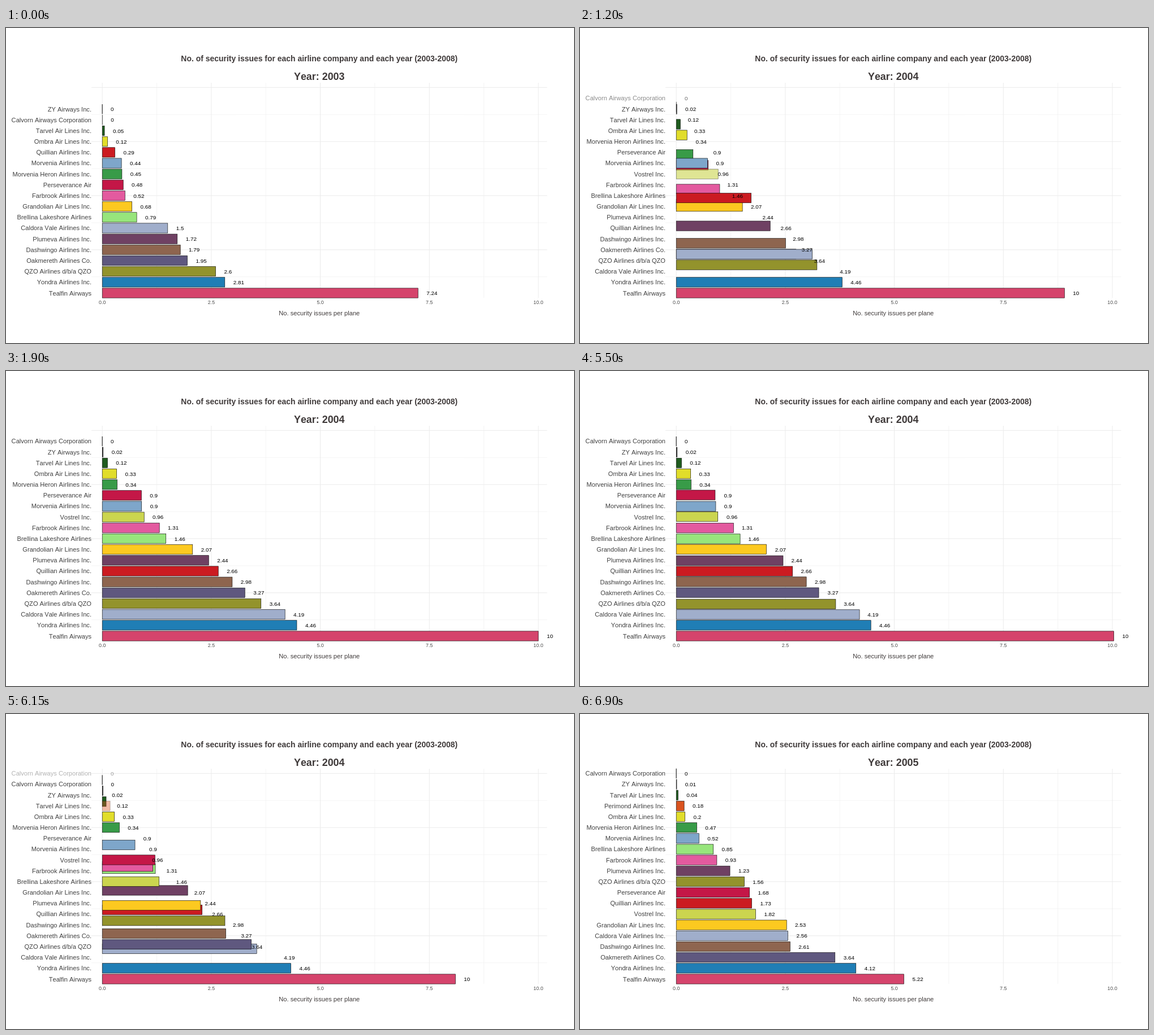
Animation, 1004 px wide and 558 px high, one loop 8000 ms. Source, as an HTML page with a canvas:

```html
<!DOCTYPE html>
<html lang="en">
<head>
<meta charset="utf-8">
<title>Security issues per airline</title>
<style>
html, body { margin: 0; width: 100%; height: 100%; overflow: hidden; background: #fff; }
canvas { display: block; }
</style>
</head>
<body>
<canvas id="stage" width="1004" height="558"></canvas>
<script>
const ctx = document.getElementById('stage').getContext('2d');
ctx.fontKerning = 'none';

// name, colour, issues per plane in 2003, 2004, 2005 (null: not yet listed)
const airlines = [
  ['ZY Airways Inc.', '#333333', 0, 0.02, 0.01],
  ['Calvorn Airways Corporation', '#777777', 0.001, 0, 0],
  ['Tarvel Air Lines Inc.', '#1f5c1f', 0.05, 0.12, 0.04],
  ['Ombra Air Lines Inc.', '#e1dd2b', 0.12, 0.33, 0.2],
  ['Quillian Airlines Inc.', '#cb1b21', 0.29, 2.66, 1.73],
  ['Morvenia Airlines Inc.', '#7ea6ca', 0.44, 0.902, 0.52],
  ['Morvenia Heron Airlines Inc.', '#389b48', 0.45, 0.34, 0.47],
  ['Perseverance Air', '#c41747', 0.48, 0.897, 1.68],
  ['Farbrook Airlines Inc.', '#e35a9f', 0.52, 1.31, 0.93],
  ['Grandolian Air Lines Inc.', '#fcc920', 0.68, 2.07, 2.53],
  ['Brellina Lakeshore Airlines', '#97e57c', 0.79, 1.46, 0.85],
  ['Caldora Vale Airlines Inc.', '#a0aecb', 1.5, 4.19, 2.56],
  ['Plumeva Airlines Inc.', '#6f4163', 1.72, 2.44, 1.23],
  ['Dashwingo Airlines Inc.', '#8e654f', 1.79, 2.98, 2.61],
  ['Oakmereth Airlines Co.', '#5f587f', 1.95, 3.27, 3.64],
  ['QZO Airlines d/b/a QZO', '#93932c', 2.6, 3.64, 1.56],
  ['Yondra Airlines Inc.', '#207eb5', 2.81, 4.46, 4.12],
  ['Tealfin Airways', '#d5446c', 7.24, 10, 5.22],
  ['Vostrel Inc.', '#cbd54f', null, 0.96, 1.82],
  ['Perimond Airlines Inc.', '#da531f', null, null, 0.18]
].map(([name, color, ...values]) => ({ name, color, values }));

// One ranking per year, largest value first
const rankings = [0, 1, 2].map(y => airlines
  .filter(a => a.values[y] !== null)
  .sort((a, b) => b.values[y] - a.values[y]));

const LOOP = 8000, STEP = 50, STEPS = 29, STARTS = [450, 5450];
const ROW = 19.167, BAR = ROW * 0.9;
const LEFT = 151, RIGHT = 956.5, TOP = 97, BOTTOM = 478.2;
const xAt = v => 170.2 + 77.08 * v;
const yAt = rank => 469.5 - ROW * rank;
const mix = (a, b, p) => a + (b - a) * p;
const clamp = (v, lo, hi) => Math.min(hi, Math.max(lo, v));

function backInOut(p) {
  const back = f => (f ** 3 - f * Math.sin(f * Math.PI)) / 2;
  return p < 0.5 ? back(2 * p) : 1 - back(2 - 2 * p);
}

function text(str, x, y, size, color, align = 'center', weight = '') {
  ctx.font = `${weight} ${size}px "Liberation Sans", Arial, sans-serif`;
  ctx.fillStyle = color;
  ctx.textAlign = align;
  ctx.fillText(str, x, y);
}

function line(x1, y1, x2, y2, width) {
  ctx.lineWidth = width;
  ctx.beginPath();
  ctx.moveTo(x1, y1);
  ctx.lineTo(x2, y2);
  ctx.stroke();
}

function drawGrid() {
  ctx.strokeStyle = '#ebebeb';
  for (let i = 0; i < 9; i++) {
    const x = xAt(i * 1.25);
    line(x, TOP, x, BOTTOM, i % 2 ? 0.5 : 1);
    if (i % 2 === 0) text((i * 1.25).toFixed(1), x, 488.7, 8.92, '#4d4d4d');
  }
  for (let i = 0; i < 8; i++) {
    const y = yAt(19 - 2.5 * i);
    line(LEFT, y, RIGHT, y, i % 2 ? 0.5 : 1);
  }
}

function drawBar(airline, year, p, fade) {
  const ends = [year, year + 1].map(y => ({
    value: airline.values[y],
    rank: rankings[y].indexOf(airline)
  }));
  const [from, to] = fade ? [ends[1], ends[1]] : ends;
  const x = xAt(0);
  const w = xAt(mix(from.value, to.value, p)) - x;
  const y = yAt(mix(from.rank, to.rank, p)) - BAR / 2;
  ctx.globalAlpha = fade ? clamp(p, 0, 1) : 1;
  ctx.fillStyle = airline.color;
  ctx.strokeStyle = '#000';
  ctx.lineWidth = 0.6;
  ctx.fillRect(x, y, w, BAR);
  ctx.strokeRect(x, y, w, BAR);
}

// Texts belong to a rank: they only slide sideways and swap halfway
function drawRow(rank, year, p, shownYear) {
  const next = rankings[year + 1][rank], prev = rankings[year][rank];
  const end = next.values[year + 1];
  const start = prev ? prev.values[year] : end;
  const shown = prev && shownYear === year ? prev : next;
  const value = prev ? shown.values[shownYear] : end;
  const y = yAt(rank);
  ctx.globalAlpha = prev ? 1 : clamp(p, 0, 1);
  text(shown.name, LEFT, y + 4, 11.11, '#404040', 'right');
  text(String(+value.toFixed(2)), xAt(mix(start, end, p)) + 14.9, y + 3.6, 9.9, '#000', 'left');
}

function draw(time) {
  const year = time < STARTS[1] ? 0 : 1;
  const step = clamp(Math.floor((time - STARTS[year]) / STEP), 0, STEPS);
  const p = backInOut(step / STEPS);
  const shownYear = step / STEPS < 0.5 ? year : year + 1;
  const old = rankings[year];
  const entering = rankings[year + 1].filter(a => !old.includes(a));

  ctx.globalAlpha = 1;
  ctx.fillStyle = '#fff';
  ctx.fillRect(0, 0, 1004, 558);
  drawGrid();
  old.forEach(a => drawBar(a, year, p, false));
  entering.forEach(a => drawBar(a, year, p, true));
  rankings[year + 1].forEach((_, rank) => drawRow(rank, year, p, shownYear));

  ctx.globalAlpha = 1;
  const ink = '#3f3a3a', mid = (LEFT + RIGHT) / 2;
  text('No. of security issues for each airline company and each year (2003-2008)', mid, 59.4, 13.94, ink, 'center', 'bold');
  text('Year: ' + (2003 + shownYear), mid, 92.4, 17.9, ink, 'center', 'bold');
  text('No. security issues per plane', mid, 508.6, 11.15, ink);
}

const begin = performance.now();
function tick() {
  draw((performance.now() - begin) % LOOP);
  requestAnimationFrame(tick);
}
tick();
</script>
</body>
</html>
```
